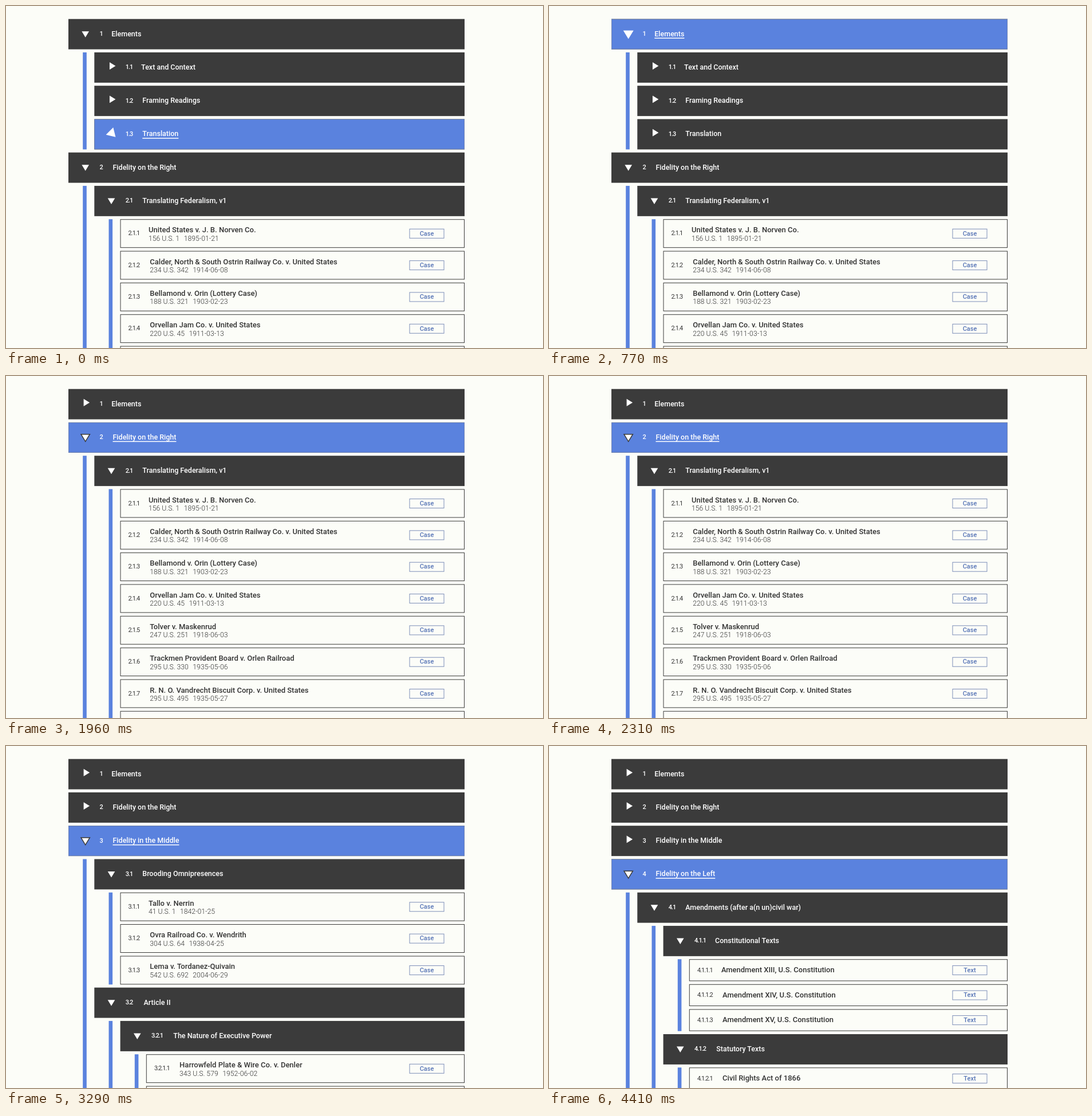
Recreate the animation shown at these times as an HTML page. Size 938 by 597 pixels, loop 4760 ms.

```html
<!DOCTYPE html>
<html lang="en">
<head>
<meta charset="utf-8">
<title>Casebook outline</title>
<style>
  html, body { margin: 0; width: 100%; height: 100%; overflow: hidden; background: #fcfdf8; }
  svg { display: block; width: 938px; height: 597px; font-family: Roboto, Arial, sans-serif; }
  .head { fill: #3b3b3b; }
  .hover { fill: #5a82de; stroke: #6a80b6; }
  .bar { fill: #5a82de; }
  .arrow { fill: #fff; stroke-width: 1.45; }
  .num { font-size: 11px; letter-spacing: -.95px; }
  .section { fill: #fff; font-weight: 500; }
  .section .title { font-size: 12.5px; }
  .item { fill: #333; }
  .item .title { font-size: 13px; font-weight: 500; }
  .cite { font-size: 12.2px; font-weight: 300; }
  .frame { fill: none; stroke: #3b3b3b; }
  .badge { fill: none; stroke: #7c8db8; }
  .tag { fill: #5573b6; font-size: 11px; font-weight: 500; text-anchor: middle; }
</style>
</head>
<body>
<svg id="stage" viewBox="0 0 938 597"></svg>
<script>
const LOOP = 4760, TOP = 22.7, GAP = 5.35, RIGHT = 801, INDENT = 45.3, TURN = 400;
const HEIGHT = { section: 52.9, Case: 49.98, Text: 38.25 };

// number | title | citation | date; "Text" in place of a citation marks a text item
const outline = `
1|Elements
1.1|Text and Context
1.2|Framing Readings
1.3|Translation
2|Fidelity on the Right
2.1|Translating Federalism, v1
2.1.1|United States v. J. B. Norven Co.|156 U.S. 1|1895-01-21
2.1.2|Calder, North & South Ostrin Railway Co. v. United States|234 U.S. 342|1914-06-08
2.1.3|Bellamond v. Orin (Lottery Case)|188 U.S. 321|1903-02-23
2.1.4|Orvellan Jam Co. v. United States|220 U.S. 45|1911-03-13
2.1.5|Tolver v. Maskenrud|247 U.S. 251|1918-06-03
2.1.6|Trackmen Provident Board v. Orlen Railroad|295 U.S. 330|1935-05-06
2.1.7|R. N. O. Vandrecht Biscuit Corp. v. United States|295 U.S. 495|1935-05-27
2.1.8||  |
3|Fidelity in the Middle
3.1|Brooding Omnipresences
3.1.1|Tallo v. Nerrin|41 U.S. 1|1842-01-25
3.1.2|Ovra Railroad Co. v. Wendrith|304 U.S. 64|1938-04-25
3.1.3|Lema v. Tordanez-Quivain|542 U.S. 692|2004-06-29
3.2|Article II
3.2.1|The Nature of Executive Power
3.2.1.1|Harrowfeld Plate & Wire Co. v. Denler|343 U.S. 579|1952-06-02
3.2.1.2||  |
4|Fidelity on the Left
4.1|Amendments (after a(n un)civil war)
4.1.1|Constitutional Texts
4.1.1.1|Amendment XIII, U.S. Constitution|Text
4.1.1.2|Amendment XIV, U.S. Constitution|Text
4.1.1.3|Amendment XV, U.S. Constitution|Text
4.1.2|Statutory Texts
4.1.2.1|Civil Rights Act of 1866|Text`;

// when each section is closed, in ms
const closeAt = { "1.1": -9000, "1.2": -9000, "1.3": -200, 1: 1285, 2: 2700, 3: 3780 };
// pointer enters row, leaves row, enters arrow
const pointer = {
  "1.3": [-1000, 350, -1000],
  1: [560, 1820, 770],
  2: [1820, 3220, 2660],
  3: [3220, 4340, 3430],
  4: [4340, 9000, 9000]
};

const stage = document.getElementById("stage");

function add(parent, tag, attrs, text) {
  const node = document.createElementNS("http://www.w3.org/2000/svg", tag);
  for (const key in attrs) node.setAttribute(key, attrs[key]);
  if (text) node.textContent = text;
  return parent.appendChild(node);
}

const clamp = v => Math.min(1, Math.max(0, v));
const easeInOut = x => x < .5 ? 2 * x * x : 1 - 2 * (1 - x) ** 2;
const fade = (t, at) => clamp((t - at + 30) / 70);

function titleOffset(num) {
  const digits = num.split(".");
  return 14 + 6.5 * digits.length + 2.2 * digits.filter(d => d !== "1").length;
}

function addSection(row) {
  const { g, num, depth, h } = row;
  const mid = h / 2, left = 109 + depth * INDENT, shift = depth * INDENT;
  const box = { x: left, y: 0, width: RIGHT - left, height: h };
  add(g, "rect", { ...box, class: "head" });
  row.hover = add(g, "g", { opacity: 0 });
  add(row.hover, "rect", {
    class: "hover", x: left + .5, y: .5, width: RIGHT - left - 1, height: h - 1
  });
  row.bar = add(g, "rect", { class: "bar", x: 134.2 + shift, y: h + GAP, width: 6.6, height: 0 });
  row.arrow = add(g, "path", {
    class: "arrow", d: `M${131 + shift} ${mid - 5.7}h15.4l-7.7 12.6z`
  });
  row.pivot = `${138.25 + shift} ${mid - 2.35}`;
  add(g, "text", { class: "num", x: 163.4 + shift, y: mid + 2.9 }, num);
  const x = 163.8 + shift + titleOffset(num);
  const title = add(g, "text", { class: "title", x, y: mid + 3.6 }, row.title);
  add(row.hover, "rect", {
    x, y: mid + 6.2, width: title.getComputedTextLength(), height: 1.5
  });
}

function addItem(row) {
  const { g, num, depth, h, kind } = row;
  const mid = h / 2, left = 109 + depth * INDENT;
  add(g, "rect", {
    class: "frame", x: left + .4, y: .5, width: RIGHT - left - .9, height: h - 1
  });
  add(g, "text", { class: "num", x: left + 14, y: mid + 3.2 }, num);
  const x = left + 13.8 + titleOffset(num);
  add(g, "text", { class: "title", x, y: mid + (kind === "Case" ? -1.9 : 3.9) }, row.title);
  if (kind === "Case") {
    const cite = add(g, "text", { class: "cite", x, y: mid + 12.5 }, row.cite);
    add(cite, "tspan", { dx: 7.5 }, row.date);
  }
  add(g, "rect", { class: "badge", x: 705, y: mid - 7.9, width: 60, height: 16 });
  add(g, "text", { class: "tag", x: 735, y: mid + 3.4 }, kind);
}

const rows = outline.trim().split("\n").map(line => {
  const [num, title, cite, date] = line.split("|");
  const kind = !cite ? "section" : cite === "Text" ? "Text" : "Case";
  const row = { num, title, cite, date, kind, depth: num.split(".").length - 1, h: HEIGHT[kind] };
  row.g = add(stage, "g", { class: kind === "section" ? "section" : "item" });
  (kind === "section" ? addSection : addItem)(row);
  return row;
});

const within = (row, parent) => row.num.startsWith(parent.num + ".");

function paintSection(row, t) {
  const [enter, leave, onArrow] = pointer[row.num] || [9e4, 9e4, 9e4];
  const glow = fade(t, enter) * (1 - fade(t, leave));
  const lit = t >= onArrow && t < leave;
  const turn = row.num in closeAt ? easeInOut(clamp((t - closeAt[row.num]) / TURN)) : 0;
  row.hover.setAttribute("opacity", glow);
  row.arrow.setAttribute("stroke", lit ? "#fff" : "#3b3b3b");
  row.arrow.setAttribute("transform", `rotate(${-90 * turn} ${row.pivot})`);
}

function render(t) {
  const closed = rows.filter(row => t >= closeAt[row.num]);
  const shown = [];
  let y = TOP;
  for (const row of rows) {
    const hidden = closed.some(parent => within(row, parent));
    row.g.setAttribute("display", hidden ? "none" : "inline");
    if (hidden) continue;
    row.y = y;
    row.g.setAttribute("transform", `translate(0 ${y.toFixed(2)})`);
    y += row.h + GAP;
    shown.push(row);
  }
  for (const row of shown) {
    if (row.kind !== "section") continue;
    paintSection(row, t);
    const last = shown.filter(child => within(child, row)).pop();
    row.bar.setAttribute("height", last ? last.y + last.h - row.y - row.h - GAP : 0);
  }
}

const start = performance.now();
function tick() {
  render((performance.now() - start) % LOOP);
  requestAnimationFrame(tick);
}
tick();
</script>
</body>
</html>
```
